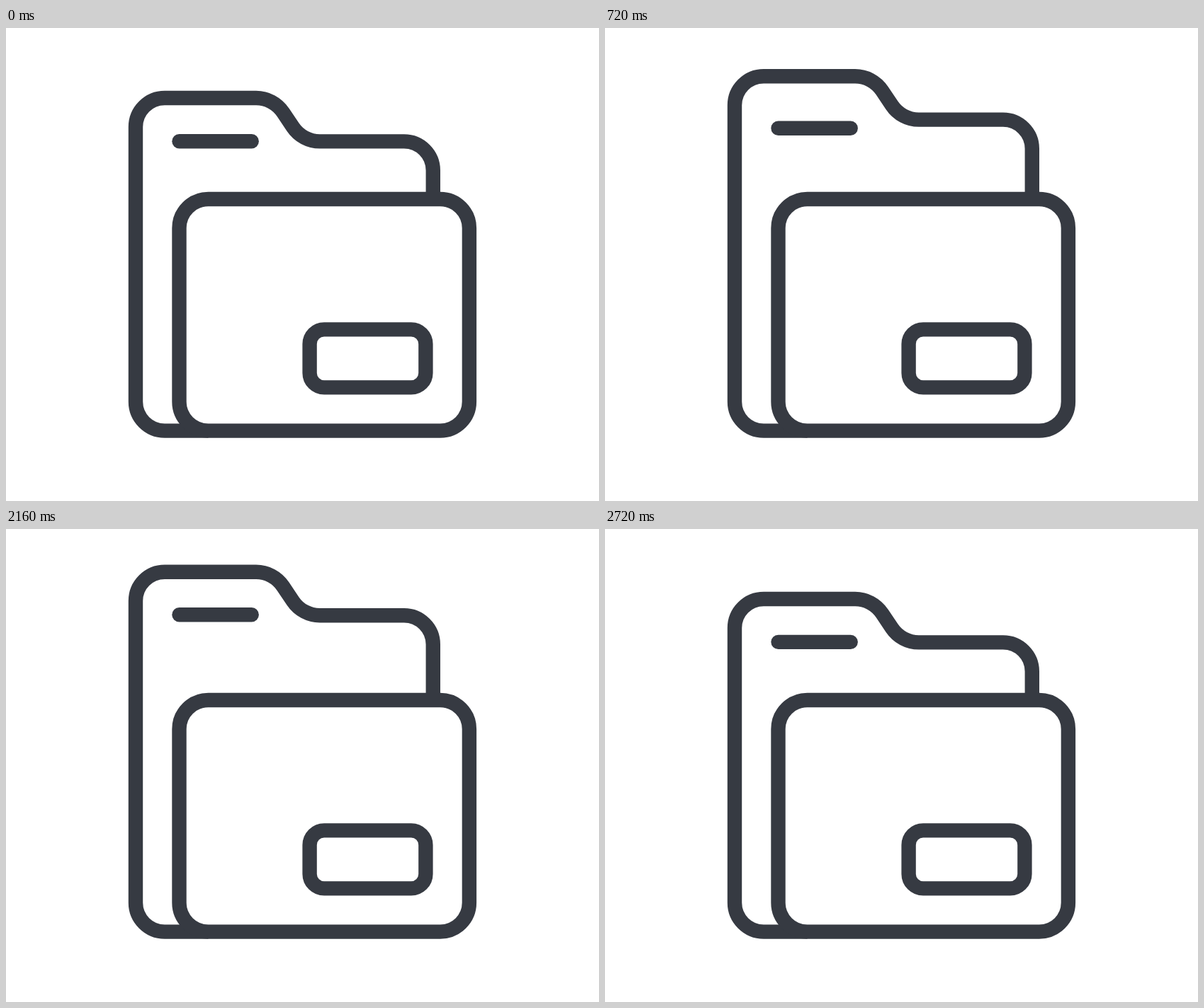
These frames come from a looping animation (837x669 px, 3.62 s). An HTML page:

```html
<!DOCTYPE html>
<html lang="en">
<head>
<meta charset="utf-8">
<title>Folder</title>
<style>
  html, body { margin: 0; width: 100%; height: 100%; overflow: hidden; background: #fff; }
  svg { display: block; width: 837px; height: 669px; }
</style>
</head>
<body>
<svg viewBox="0 0 837 669" fill="none" stroke="#363a42" stroke-width="20.4">
  <path id="back"/>
  <path id="tab" d="M244.5 160.2H346.7" stroke-linecap="round"/>
  <rect x="244.5" y="242" width="409.4" height="327.6" rx="41" fill="#fff"/>
  <rect x="428.6" y="426.4" width="163.8" height="82" rx="20.5"/>
</svg>
<script>
const LOOP = 3620, DURATION = 573, OPEN = 389, CLOSE = 2129, TAB_DELAY = 83;
const LIFT = 38.3, TAB_LIFT = 39;
const back = document.getElementById('back');
const tab = document.getElementById('tab');

const bezier = (t, a, b) => 3 * (1 - t) ** 2 * t * a + 3 * (1 - t) * t * t * b + t ** 3;

// cubic-bezier(.6, 0, .25, 1), solved by bisection
function ease(x) {
  if (x <= 0) return 0;
  if (x >= 1) return 1;
  let lo = 0, hi = 1;
  for (let i = 0; i < 24; i++) {
    const mid = (lo + hi) / 2;
    if (bezier(mid, 0.6, 0.25) < x) lo = mid; else hi = mid;
  }
  return bezier(lo, 0, 1);
}

const raised = ms => ease((ms - OPEN) / DURATION) - ease((ms - CLOSE) / DURATION);

function draw(ms) {
  const top = 99 - LIFT * raised(ms);
  back.setAttribute('d', `M285.5 569.6H224a41 41 0 0 1-41-41V${top + 41}a41 41 0 0 1 41-41H353
    a45.8 45.8 0 0 1 38.1 20.4l13.8 20.6a45.8 45.8 0 0 0 38.1 20.4H561.8a41 41 0 0 1 41 41V242`);
  tab.setAttribute('transform', `translate(0 ${-TAB_LIFT * raised(ms - TAB_DELAY)})`);
}

const start = performance.now();
function tick() {
  draw((performance.now() - start) % LOOP);
  requestAnimationFrame(tick);
}
tick();
</script>
</body>
</html>
```
